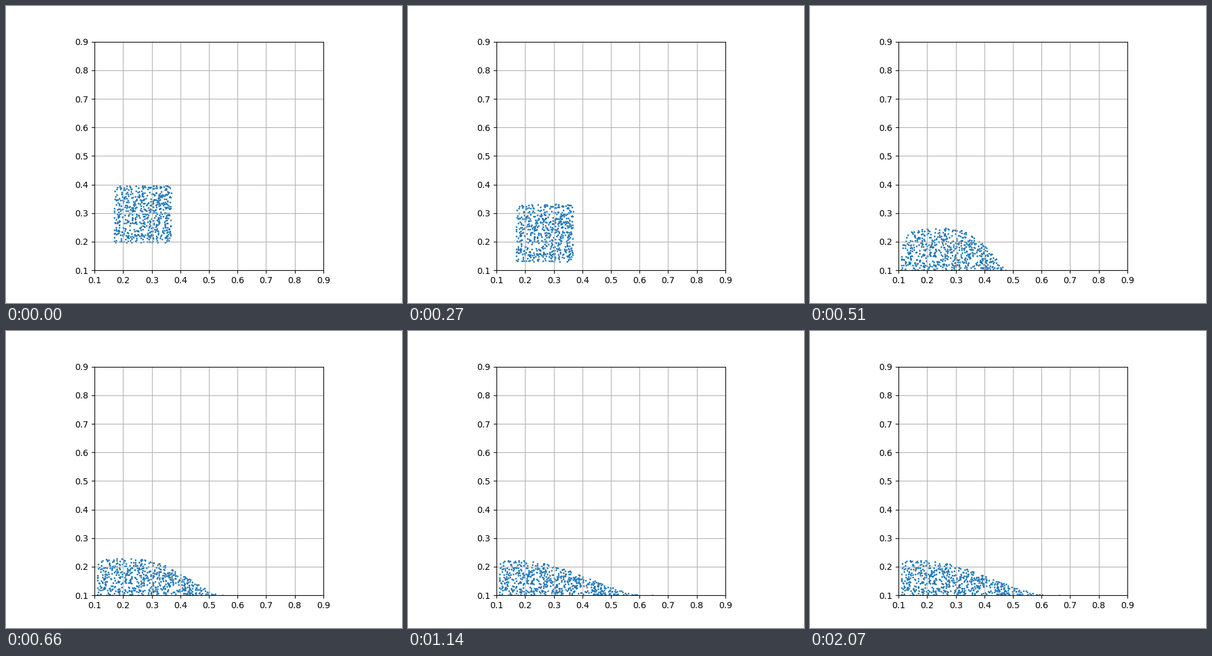
Recreate the animation shown at these times as a matplotlib script. Size 640 by 480 pixels, loop 2.1 s.

```python
import numpy as np
import matplotlib.pyplot as plt
from matplotlib.animation import FuncAnimation

FRAMES, INTERVAL = 70, 30
COUNT = 600
FLOOR, WALL = 0.1, 0.109
LEFT, RIGHT, SIZE = 0.168, 0.367, 0.2   # the block before it lands
START_Y = 0.197
FALL, LEAD = 0.000564, 2                # half the gravity, frames already fallen
IMPACT = 11.3                           # frame at which the block lands


def unit(a):
    return (a - a.min()) / np.ptp(a)


rng = np.random.default_rng(4)
u, v = unit(rng.random(COUNT)), unit(rng.random(COUNT))


def flank(x, shoulder, foot, power):
    """Drop from 1 at the shoulder to 0 at the foot; upright at power 0."""
    s = np.clip((x - shoulder) / (foot - shoulder), 0, 1)
    return (1 - s * s) ** power


def outline(t):
    """Surface of the collapsing pile, t frames after it lands."""
    left = max(WALL, LEFT - 0.0165 * t)
    front = RIGHT + 0.295 * np.tanh(t / 15)
    crest = 0.124 + 0.076 * np.exp(-(t / 5) ** 1.3)
    shoulder = 0.16 + 0.14 * np.exp(-(t / 13) ** 2)
    slump = 2.3 * (1 - np.exp(-t / 9))
    lean = 0.55 * t * np.exp(-t / 2)    # passing bulge on the wall side
    x = np.linspace(left, front, 800)
    h = crest * flank(x, shoulder, front, slump) * flank(x, 0.2, left, lean)
    return x, h


def grains(n):
    if n <= IMPACT:
        drop = FALL * ((n + LEAD) ** 2 - LEAD ** 2)
        return np.column_stack([LEFT + (RIGHT - LEFT) * u,
                                START_Y - drop + SIZE * v])
    # Spread the grains evenly under the outline, keeping their order
    x, h = outline(n - IMPACT)
    area = np.concatenate([[0], np.cumsum((h[1:] + h[:-1]) / 2)])
    px = np.interp(u, area / area[-1], x)
    return np.column_stack([px, FLOOR + v * np.interp(px, x, h)])


fig, ax = plt.subplots(figsize=(6.4, 4.8), dpi=100)
dots = ax.scatter(*grains(0).T, s=1)
ticks = np.arange(1, 10) / 10
ax.set(aspect="equal", xlim=(0.1, 0.9), ylim=(0.1, 0.9),
       xticks=ticks, yticks=ticks)
ax.grid(True)


def update(n):
    dots.set_offsets(grains(n))
    return dots,


anim = FuncAnimation(fig, update, frames=FRAMES, interval=INTERVAL,
                     repeat=True, repeat_delay=0)
plt.show()
```
